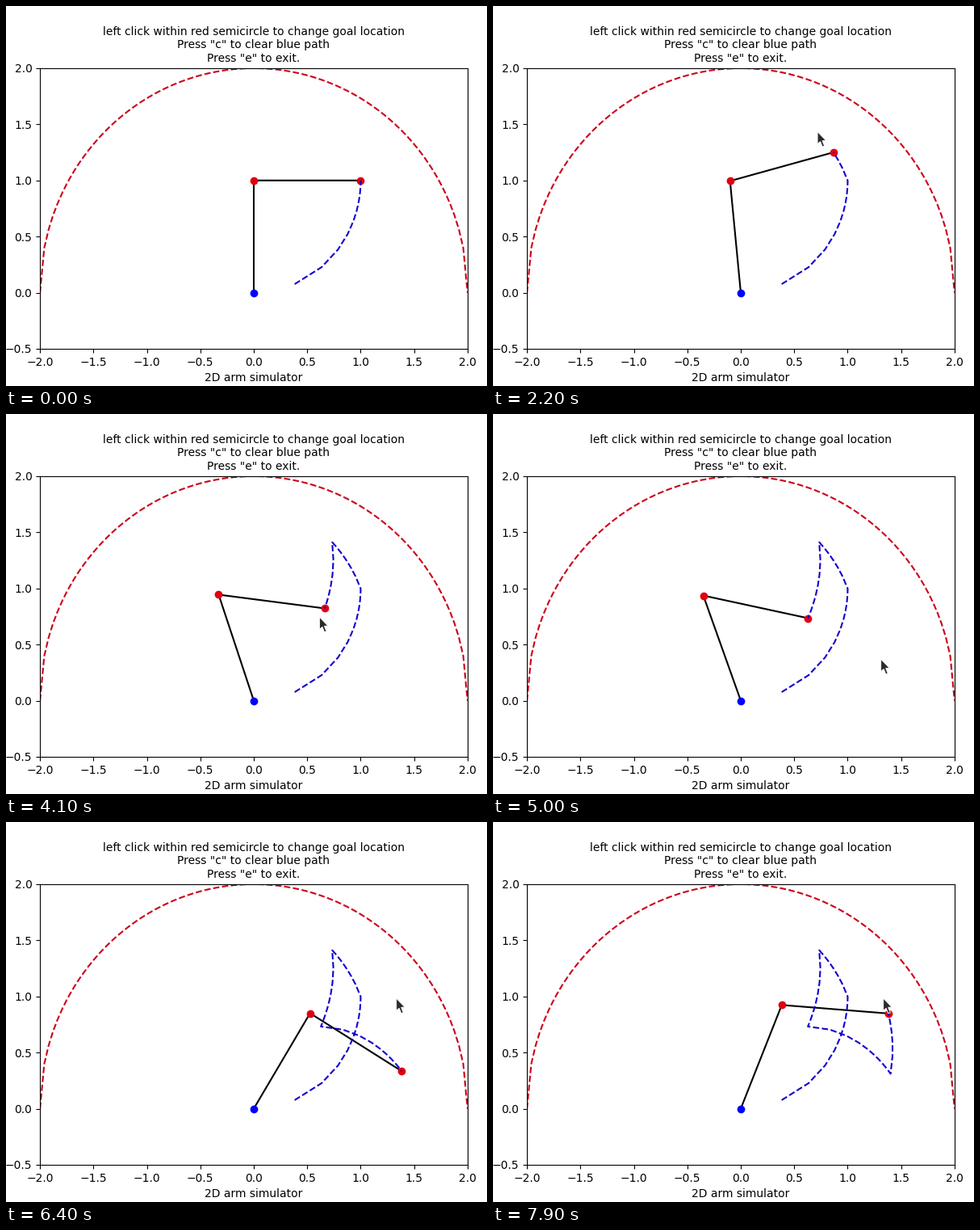
Write a matplotlib script that moves like this. It is 596 px wide and 470 px high and loops after 8000 ms.

```python
import numpy as np
import matplotlib.pyplot as plt
from matplotlib.animation import FuncAnimation
from matplotlib.patches import Polygon

W, H, DPI = 596, 470, 100
LEFT, RIGHT, BOTTOM, TOP = 42.1, 571.9, 46.05, 393.05   # plot box in pixels
FRAMES, STEP_MS = 80, 100
GAIN = 0.25        # share of the joint error removed per step
WARMUP = 30        # steps already taken when the loop begins
TRAVEL = 5         # frames the pointer needs to reach a new goal
APPEAR = 9         # first frame with the pointer in view
RED, DOT_RED, BLUE, DOT_BLUE = "#cc0019", "#e2000f", "#1200d0", "#0000ff"

HOME = (0.94, 1.105)
# pointer arrival frame, click frame, goal
CLICKS = [(19, 19, (0.729, 1.417)), (34, 34, (0.626, 0.728)),
          (51, 52, (1.403, 0.309)), (64, 73, (1.345, 0.966))]


def solve(x, y):
    """Joint angles that put the wrist on (x, y), elbow up."""
    half = np.arccos(np.hypot(x, y) / 2)
    return np.array([np.arctan2(y, x) + half, -2 * half])


def forward(q):
    elbow = np.array([np.cos(q[0]), np.sin(q[0])])
    return elbow, elbow + [np.cos(q.sum()), np.sin(q.sum())]


def simulate():
    """Elbow and wrist for every step of a proportional controller."""
    q, goal = np.array([np.pi / 2, -np.pi]), solve(1, 1)
    goals = {click: solve(*point) for _, click, point in CLICKS}
    poses = []
    for n in range(1 - WARMUP, FRAMES):
        q = q + GAIN * (goal - q)
        poses.append(forward(q))
        goal = goals.get(n, goal)
    return np.array(poses)


def pointer(n):
    """Arrow tip in pixels, gliding from goal to goal."""
    pos = np.array(HOME)
    for arrive, _, point in CLICKS:
        u = np.clip((n - arrive) / TRAVEL + 1, 0, 1)
        pos = pos + (point - pos) * u * u * (3 - 2 * u)
    x = LEFT + (pos[0] + 2) * (RIGHT - LEFT) / 4
    y = BOTTOM + (pos[1] + 0.5) * (TOP - BOTTOM) / 2.5
    return np.array([x - 1.5, H - y - 2.5])


def arrow(tilt=np.radians(22)):
    """Pointer outline: one half mirrored across a tilted axis."""
    half = np.array([(14.3, 5.8), (12.8, 1.4), (19.7, 1.4)])
    outline = np.vstack([(0, 0), half, half[::-1] * (1, -1)])
    along, across = outline.T
    c, s = np.cos(tilt), np.sin(tilt)
    return np.column_stack([along * s - across * c, along * c + across * s])


poses = simulate()
shape = arrow()

fig = plt.figure(figsize=(W / DPI, H / DPI), dpi=DPI, facecolor="white")
ax = fig.add_axes([LEFT / W, BOTTOM / H, (RIGHT - LEFT) / W, (TOP - BOTTOM) / H])
ax.set(xlim=(-2, 2), ylim=(-0.5, 2), xticks=np.arange(-2, 2.1, 0.5),
       yticks=np.arange(-0.5, 2.1, 0.5))
ax.set_xlabel("2D arm simulator")
ax.set_title("left click within red semicircle to change goal location\n"
             'Press "c" to clear blue path\nPress "e" to exit.', fontsize=10)

reach = np.linspace(-2, 2, 100)
ax.plot(reach, np.sqrt(4 - reach ** 2), "--", color=RED)
arm, = ax.plot([], [], "k-")
ax.plot([0], [0], "o", color=DOT_BLUE)
joints, = ax.plot([], [], "o", color=DOT_RED)
trail, = ax.plot([], [], "--", color=BLUE)

overlay = fig.add_axes([0, 0, 1, 1])
overlay.set(xlim=(0, W), ylim=(H, 0))
overlay.axis("off")
cursor = overlay.add_patch(Polygon(shape, facecolor="#2b2b2b",
                                   edgecolor="white", linewidth=0.7))


def draw(n):
    i = n + WARMUP - 1
    arm.set_data(*np.vstack([(0, 0), poses[i]]).T)
    joints.set_data(*poses[i].T)
    trail.set_data(*poses[:i + 1, 1].T)
    cursor.set_visible(n >= APPEAR)
    cursor.set_xy(shape + pointer(n))
    return arm, joints, trail, cursor


anim = FuncAnimation(fig, draw, frames=FRAMES, interval=STEP_MS,
                     repeat=True, repeat_delay=0)
plt.show()
```
